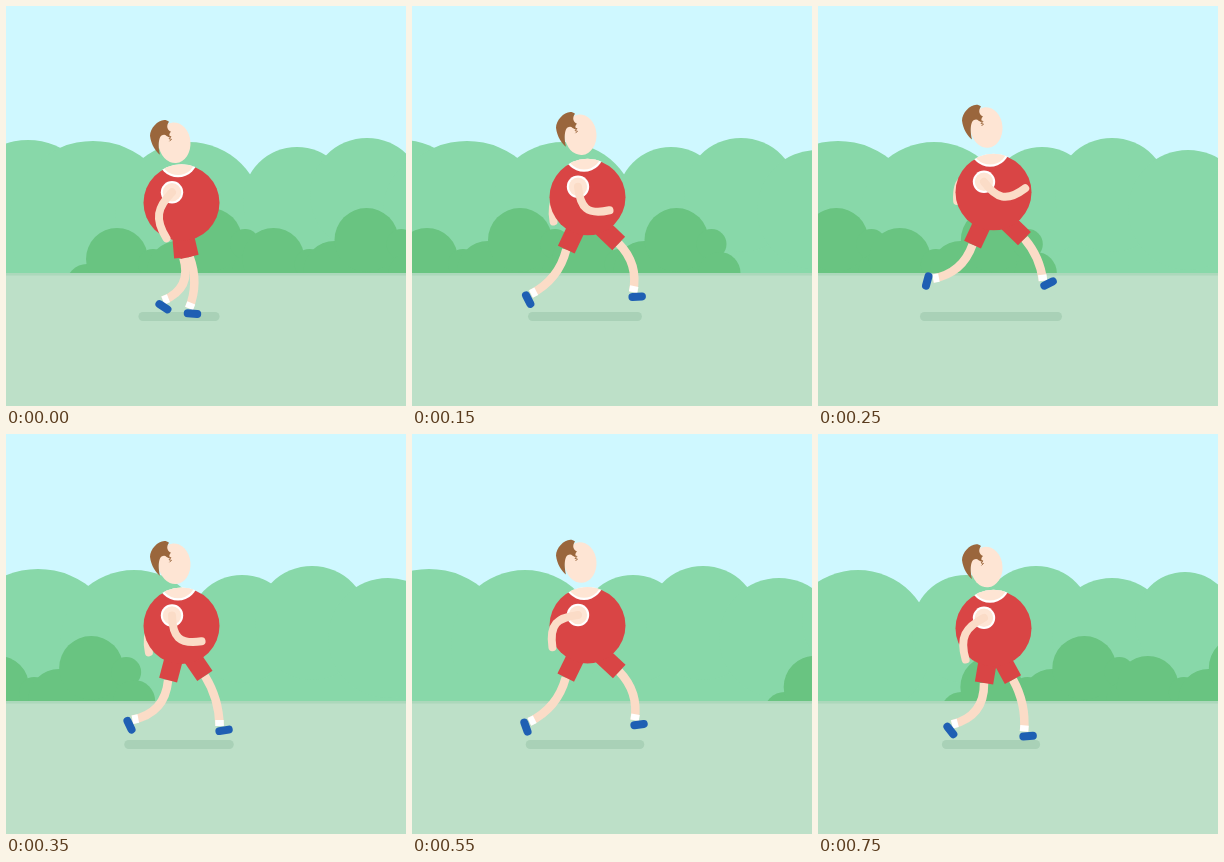
An HTML page with a canvas that plays this animation: 400x400 px, repeating every 800 ms.

```html
<!DOCTYPE html>
<html lang="en">
<head>
<meta charset="utf-8">
<title>Runner</title>
<style>
html, body { margin: 0; width: 100%; height: 100%; overflow: hidden; background: #cff8ff; }
canvas { display: block; width: 100%; height: 100%; }
</style>
</head>
<body>
<canvas id="stage" width="400" height="400"></canvas>
<script>
const LOOP = 800, STEP = 50, TURN = 2 * Math.PI, DEG = Math.PI / 180;
const ctx = document.getElementById('stage').getContext('2d');
const C = {
  sky: '#cff8ff', hill: '#88d8a9', bush: '#69c481', ground: '#bde0c8', edge: '#acd8bb',
  shadow: '#a9d1b7', red: '#d94545', face: '#fee5d4', skin: '#fbdcc7',
  white: '#ffffff', shoe: '#1f5fb3', hair: '#9a663c'
};

// Straight pieces through [time, value] points
const drift = keys => t => {
  let i = keys.length - 2;
  while (keys[i][0] > t) i--;
  const [[t0, a], [t1, b]] = [keys[i], keys[i + 1]];
  return a + (b - a) * (t - t0) / (t1 - t0);
};
const hillX = drift([[0, 244], [150, 212], [250, 177], [350, 189], [450, 220], [650, 128], [750, 101], [LOOP, 85]]);
const bushX = drift([[0, 63], [150, -33], [450, -302], [500, 412], [LOOP, 68]]);

// x offset, centre y, radius
const hills = [
  [-222, 204, 70], [-157, 219, 84], [-61, 210, 74], [47, 195, 54],
  [117, 189, 57], [193, 204, 60], [266, 188, 50]
];
const clump = [[48, 253, 31], [84, 258, 15], [109, 266, 31], [141, 234, 32], [176, 238, 15], [184, 267, 21]];

function disc(x, y, r, color) {
  ctx.fillStyle = color;
  ctx.beginPath();
  ctx.arc(x, y, r, 0, TURN);
  ctx.fill();
}
function rect(x, y, w, h, color) {
  ctx.fillStyle = color;
  ctx.fillRect(x, y, w, h);
}
function stroke(path, width, color, cap = 'butt') {
  ctx.lineWidth = width;
  ctx.strokeStyle = color;
  ctx.lineCap = cap;
  ctx.stroke(new Path2D(path));
}

function scenery(t) {
  rect(0, 0, 400, 400, C.sky);
  rect(0, 200, 400, 70, C.hill);
  hills.forEach(([x, y, r]) => disc(hillX(t) + x, y, r, C.hill));
  const left = bushX(t);
  disc(left + 18, 279, 21, C.bush);
  for (const x0 of [left, left + 156.5]) {
    rect(x0 + 48, 262, 136, 8, C.bush);
    rect(x0 + 110, 250, 67, 20, C.bush);
    clump.forEach(([x, y, r]) => disc(x0 + x, y, r, C.bush));
  }
  rect(0, 267, 400, 133, C.ground);
  rect(0, 267, 400, 2.5, C.edge);
}

// angle 0: fully forward, 90 degrees: standing, 180: fully back, 270: swinging
function leg(angle, torsoY, hop) {
  const c = Math.cos(angle), v = Math.sin(angle);
  const reach = c * (1.4 - 0.4 * c * c);
  const hx = 180.5 + 26 * reach - 5 * v;
  const hy = torsoY + 55 - (hx - 173) ** 2 / 130;
  const ax = 170 + 55 * reach - 4 * v;
  const ay = 300 + 3 * v - (c < 0 ? 2 : 0) - 2.3 * hop * Math.abs(c) ** 0.5;

  const bend = 16 - 4 * c - 5 * v - 5 * c * c;
  const d = Math.hypot(ax - hx, ay - hy);
  const kx = (hx + ax) / 2 + bend * (ay - hy) / d;
  const ky = (hy + ay) / 2 - bend * (ax - hx) / d;
  stroke(`M${hx} ${hy}Q${kx} ${ky} ${ax} ${ay}`, 8.5, C.skin);

  const shin = Math.hypot(ax - kx, ay - ky);
  stroke(`M${ax} ${ay}l${(kx - ax) / shin * 6} ${(ky - ay) / shin * 6}`, 8.5, C.white);

  const tilt = (17 - 12 * v ** 3 - 66 * c * Math.abs(c) + 22 * c * c) * DEG;
  ctx.save();
  ctx.translate(ax, ay);
  ctx.rotate(tilt);
  stroke('M-1 5h9.5', 8, C.shoe, 'round');
  ctx.restore();

  stroke(`M${175 + 0.33 * (hx - 178)} ${torsoY + 25}L${hx} ${hy}`, 18.5, C.red);
}

// swing runs from -1 (back) to 1 (front)
function arm(swing, y) {
  const upper = (-36 + 35 * swing + 38 * swing ** 3) * DEG;
  const fore = (45 + 62 * swing + 20 * swing ** 2) * DEG;
  const ex = 30 * Math.sin(upper), ey = 30 * Math.cos(upper);
  const fx = 29 * Math.sin(fore), fy = 29 * Math.cos(fore);
  const curve = [0.7 * ex, 0.7 * ey, ex + 0.2 * fx, ey + 0.2 * fy, ex + fx, ey + fy];
  stroke(`M166 ${y}c${curve}`, 8, C.skin, 'round');
}

function torso(y) {
  disc(175.5, y, 38, C.red);
  ctx.save();
  ctx.beginPath();
  ctx.arc(175.5, y, 38.5, 0, TURN);
  ctx.clip();
  disc(172, y - 45.5, 20, C.white);
  disc(172, y - 45.5, 17.8, C.face);
  ctx.restore();
}

function head(y) {
  ctx.save();
  ctx.translate(169, y);
  ctx.fillStyle = C.face;
  ctx.beginPath();
  ctx.ellipse(-0.5, 0, 16, 20.3, -0.08, 0, TURN);
  ctx.fill();
  ctx.fillStyle = C.hair;
  ctx.fill(new Path2D('M-6-21C-13-27-25-16-25-7C-24 2-19 9-15 12C-17 3-17-8-11-8' +
    'C-9-8-8-6-5-5C-6-8-6-9-4-11C-8-13-9-17-6-21Z'));
  stroke('M-7-7L-4-6L-6-4L-3.5-3.5L-5.5-1.5', 0.9, C.hair);
  ctx.restore();
}

function draw(t) {
  scenery(t);

  // The stride runs slightly ahead around the loop's end
  const ahead = 12.5 * (1 + Math.cos(TURN * (t - 700) / LOOP));
  const stride = TURN * (t + ahead - 250) / LOOP;
  const swing = Math.cos(stride), spread = swing * swing;
  const hop = (10 + swing) * spread;
  const y = 197.3 - hop, shoulder = y - 10.5;

  const half = 34.5 + 32 * spread;
  stroke(`M${173 - half} 310.5h${2 * half}`, 9, C.shadow, 'round');
  arm(-swing, shoulder);
  const legs = [stride, stride + Math.PI];
  legs.sort((a, b) => Math.sin(a) - Math.sin(b));
  legs.forEach(angle => leg(angle, y, hop));
  torso(y);
  disc(166, shoulder, 11.2, C.white);
  disc(166, shoulder, 9.2, C.face);
  arm(swing, shoulder);
  head(y - 59.8 - 5 * spread);
}

const start = performance.now();
function tick() {
  const t = (performance.now() - start) % LOOP;
  draw(Math.floor(t / STEP) * STEP);
  requestAnimationFrame(tick);
}
tick();
</script>
</body>
</html>
```
